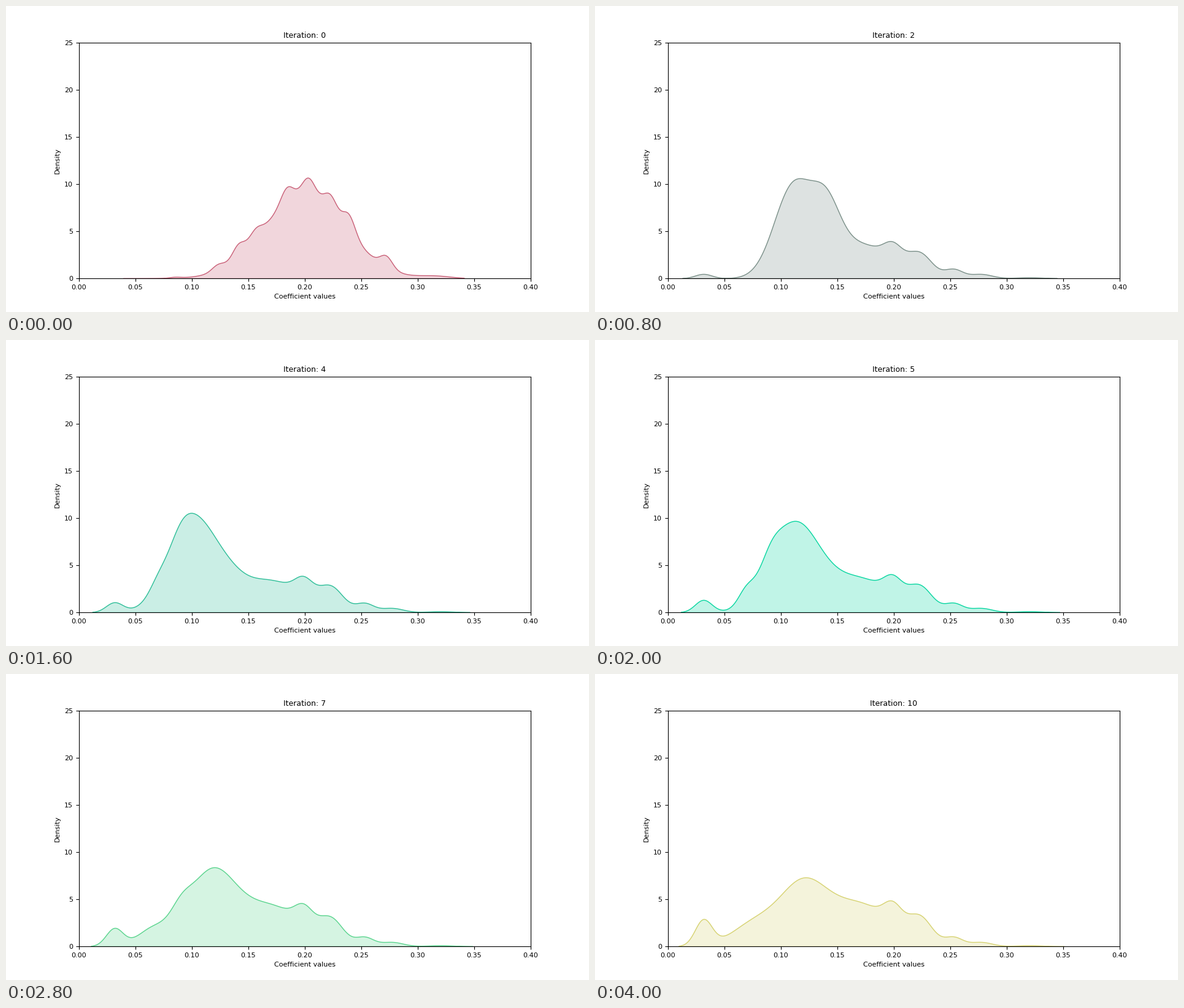
Animation, 950 px wide and 500 px high, one loop 4400 ms. Source, as a matplotlib script:

```python
import matplotlib.pyplot as plt
import numpy as np
from matplotlib.animation import FuncAnimation
from matplotlib.colors import LinearSegmentedColormap, to_rgba

ITERATIONS = 11
INTERVAL = 400


def bumps(x, *parts):
    """Sum of Gaussian bumps, each given as (centre, width, height)."""
    return sum(h * np.exp(-((x - c) / s) ** 2 / 2) for c, s, h in parts)


# All coefficient values below are in thousandths.
def start(x):
    ripples = [(123, .6), (141, 1.3), (156, 1), (184, 1.5),
               (203, 1.7), (222.5, 1.5), (239, 1.8), (272, 1.2)]
    return (bumps(x, (200, 36, 9), (85, 5, .1), (315, 14, .25))
            + bumps(x, *[(c, 5.5, h) for c, h in ripples]))


def collapse(x):
    return bumps(x, (30.2, 8.8, 27.1), (75, 28, .75), (127, 21, 1.75),
                 (185, 21, 3), (228, 11, 1.4), (255, 17, .55), (318, 12, .1))


# Main humps at key iterations; the ones between are blended.
humps = {
    2: [(111, 17, 9.6), (140, 12.5, 5.4), (170, 28, 3.6)],
    3: [(95.5, 20, 12.3), (135, 12, .9), (170, 28, 3.1)],
    5: [(112, 22, 9.2), (69, 7, 1.4), (90, 9, 1.6), (170, 28, 3.5)],
    7: [(117, 21, 7.6), (66, 14, 1.8), (90, 9, 1.7), (170, 28, 4.2)],
    10: [(119, 21, 6.2), (76, 20, 2.3), (170, 28, 4.4)],
}


def recovery(x, k):
    before = max(i for i in humps if i <= k)
    after = min(i for i in humps if i >= k)
    mix = (k - before) / max(after - before, 1)
    main = (1 - mix) * bumps(x, *humps[before]) + mix * bumps(x, *humps[after])
    return main + bumps(x, (31.5, 7.5, .28 * k - .1), (199, 8, 1.5 + .05 * k),
                        (223, 11, 2.1 + .05 * k), (253, 8, .9),
                        (277, 10, .45), (320, 12, .1))


def density(k):
    if k == 0:
        x = np.linspace(39, 341, 400)
        y = start(x)
    elif k == 1:
        x = np.linspace(3.5, 354, 400)
        y = collapse(x)
    else:
        x = np.linspace(13.5 - .4 * k, 343 + .8 * k, 400)
        y = recovery(x, k)
    return x / 1000, y


plt.rcParams.update({"font.family": "DejaVu Sans", "font.size": 8})
palette = LinearSegmentedColormap.from_list("blend", ["#ef476f", "#06d6a0", "#ffd166"])

fig, ax = plt.subplots(figsize=(9.5, 5), dpi=100)
ax.set(xlim=(0, 0.4), ylim=(0, 25), xlabel="Coefficient values", ylabel="Density")
title = ax.set_title("", fontsize=9)


def update(k):
    for area in list(ax.collections):
        area.remove()
    color = palette((k + 1) / (ITERATIONS + 1))
    x, y = density(k)
    ax.fill_between(x, 0, y, facecolor=to_rgba(color, 0.25), edgecolor=color, linewidth=1)
    title.set_text(f"Iteration: {k}")


anim = FuncAnimation(fig, update, frames=ITERATIONS, interval=INTERVAL,
                     init_func=lambda: None, repeat=True, repeat_delay=0)
plt.show()
```
